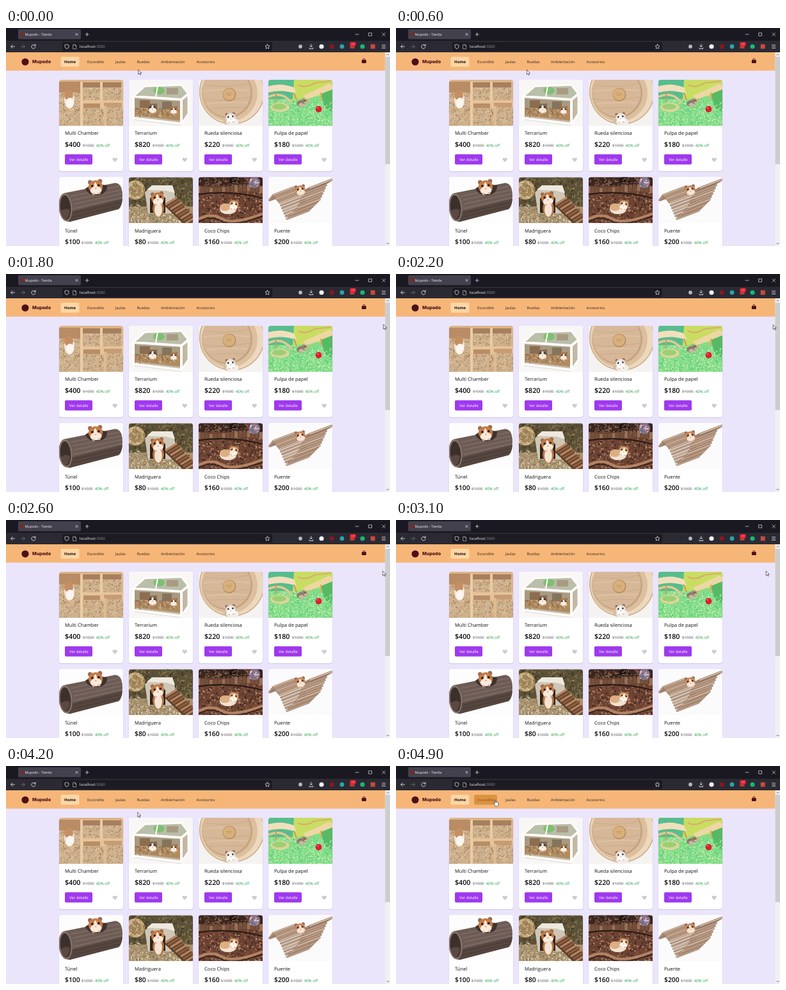
An HTML page that plays this animation: 600x341 px, repeating every 5 s.

```html
<!DOCTYPE html>
<html lang="es">
<head>
<meta charset="utf-8">
<title>Mupodo - Tienda</title>
<style>
html, body { margin: 0; width: 100%; height: 100%; overflow: hidden; background: #ebe5fc; }
svg { display: block; }
text { font-family: "Open Sans", "Noto Sans", sans-serif; white-space: pre; text-rendering: geometricPrecision; }
</style>
</head>
<body>
<svg id="stage" width="100%" height="100%" viewBox="0 0 600 341" preserveAspectRatio="none"></svg>
<script>
const rect = (x, y, w, h, fill, more = '') =>
  `<rect x="${x}" y="${y}" width="${w}" height="${h}" fill="${fill}" ${more}/>`;
const oval = (x, y, rx, ry, fill, more = '') =>
  `<ellipse cx="${x}" cy="${y}" rx="${rx}" ry="${ry}" fill="${fill}" ${more}/>`;
const dot = (x, y, r, fill, more) => oval(x, y, r, r, fill, more);
const shape = (d, fill, more = '') => `<path d="${d}" fill="${fill}" ${more}/>`;
const line = (d, color, width = 1, more = '') =>
  `<path d="${d}" fill="none" stroke="${color}" stroke-width="${width}" ${more}/>`;
const label = (x, y, s, size, fill, more = '') =>
  `<text x="${x}" y="${y}" font-size="${size}" fill="${fill}" ${more}>${s}</text>`;
const group = (move, body) => `<g transform="${move}">${body}</g>`;

function randomFrom(seed) {
  return () => {
    seed = (seed * 1664525 + 1013904223) >>> 0;
    return seed / 4294967296;
  };
}

// Short random strokes: shavings, straw, chips
function flecks(seed, count, x, y, w, h, colors, len = 3, width = 0.9) {
  const rnd = randomFrom(seed);
  return colors.map(color => {
    let d = '';
    for (let i = 0; i < count / colors.length; i++) {
      const a = rnd() * Math.PI, l = len * (0.4 + rnd() * 0.6);
      d += `M${(x + rnd() * w).toFixed(1)} ${(y + rnd() * h).toFixed(1)}` +
           `l${(Math.cos(a) * l).toFixed(1)} ${(Math.sin(a) * l).toFixed(1)}`;
    }
    return line(d, color, width);
  }).join('');
}

// Side view
function hamster(x, y, size, fur, belly = '#f6ece0', turn = 0) {
  return group(`translate(${x} ${y}) rotate(${turn}) scale(${size})`,
    oval(0, 0, 9, 7, fur) + oval(2, 3, 7, 4.2, belly) + dot(7, -4, 5, fur) +
    dot(4, -8.5, 1.9, '#b8806a') + dot(9.6, -8, 1.7, '#b8806a') +
    oval(9, -2, 3, 2.4, belly) + dot(8, -5, 0.9, '#20140f') + dot(12, -3.4, 0.6, '#d88a86'));
}

// Front view of the head and paws
function face(x, y, size, fur, belly = '#f8efe4', turn = 0) {
  return group(`translate(${x} ${y}) rotate(${turn}) scale(${size})`,
    dot(-7, -7, 3, '#9d6a55') + dot(7, -7, 3, '#9d6a55') +
    oval(0, 0, 10, 9, fur) + oval(0, 5, 8, 5.5, belly) + oval(0, -1, 2, 5, belly) +
    dot(-4.6, -1.6, 1.5, '#1d1310') + dot(4.6, -1.6, 1.5, '#1d1310') +
    oval(0, 2.6, 1.2, 0.8, '#d98a86') + oval(-4, 9.5, 1.9, 1.4, '#e5b9a4') + oval(4, 9.5, 1.9, 1.4, '#e5b9a4'));
}

const shavings = ['#ecd9be', '#b98f66', '#dcc09a', '#8f6d50'];

function chamber() {
  const bed = (seed, x, y, w, h) =>
    rect(x, y, w, h, '#cdb08c') + flecks(seed, w * h / 7, x, y, w, h, shavings, 3);
  return rect(0, 0, 100, 72, '#dcb487') +
    rect(0, 3, 33, 19, '#b98c66') + bed(3, 0, 20, 33, 25) +
    rect(37, 4, 27, 10, '#a87f5e') + bed(7, 37, 12, 27, 20) +
    rect(68, 4, 29, 10, '#a87f5e') + bed(11, 68, 12, 29, 20) +
    rect(33, 32, 67, 12, '#e6c398') + rect(38, 37, 26, 7, '#b98d68') + rect(70, 36, 28, 8, '#c79c74') +
    bed(13, 37, 44, 33, 28) + bed(17, 74, 43, 26, 29) + bed(19, 0, 46, 33, 26) +
    rect(33, 3, 4, 69, '#ebcca3') + rect(64, 3, 4, 30, '#ebcca3') + rect(70, 41, 4, 31, '#e0bb90') +
    oval(16, 31, 8, 14, '#f1e6da') + oval(15, 24, 7, 8, '#c58f62') + oval(17, 36, 6, 8, '#faf5ee');
}

function terrarium() {
  const white = '#fdfcfa';
  return rect(0, 0, 100, 72, '#f8f7f6') +
    shape('M7 26L25 10 82 8 93 22V53L82 69 7 60Z', '#c3b8a4') +
    shape('M24 12L80 10 90 22 80 28 12 24Z', '#b9bfa8') +
    oval(47, 17, 9, 6, '#7fbf72') + rect(59, 13, 18, 10, '#a99b83') +
    shape('M9 28L81 32V48L9 44Z', '#a79a80') +
    shape('M9 44L81 47V64L9 56Z', '#b18b60') +
    flecks(23, 150, 10, 44, 68, 13, ['#dcc39a', '#8a6746', '#6f5a45', '#c9a678'], 3.5, 1) +
    rect(17, 32, 16, 12, '#8c6d50') + rect(52, 34, 15, 12, '#85745c') +
    face(37, 44, .75, '#7d654f') + face(70, 47, .6, '#a5764c') +
    line('M7 26L25 10 82 8 93 22V53L82 69', white, 3) +
    line('M7 26L82 31 93 22M82 31V69M7 24V60L82 69', white, 4) +
    line('M45 10L42 27', white, 2) + line('M9 29L80 33M9 62.5L82 71.5', '#cbc4ba', .6);
}

function wheel() {
  return rect(0, 0, 100, 72, '#f5f3f1') +
    dot(52, 19, 51, '#c9a680') + dot(52, 19, 49.6, '#ecd8be') +
    dot(48, 21, 44, '#dcbf9d') + dot(45, 21, 39, '#c5a27f') + dot(44, 20, 37.5, '#d6b899') +
    line('M10 8Q45 14 78 5M8 30Q38 35 80 27M18 45Q45 42 72 44', '#cba988', 1.1) +
    line('M8 18Q38 13 80 17M12 38Q42 34 77 36', '#dfc5a8', 1.3) +
    dot(48, 23, 10.5, '#b58c60') + dot(47.6, 22.6, 9.4, '#d8b07c') +
    line('M43 21.5h9M44 24h7', '#b58c60', .7) +
    oval(51, 66, 13, 5, '#d3bda4') + oval(53, 66, 10, 6, '#f2eee9') +
    face(50, 59, .78, '#e5e0da', '#ffffff', -8);
}

function paperBed() {
  return rect(0, 0, 100, 72, '#84dc88') +
    shape('M0 0H44L40 30H0Z', '#57bd8d') + shape('M40 0H100V24L63 27 38 32Z', '#c9dd63') +
    shape('M82 22L100 14V50L88 44Z', '#58b964') +
    flecks(29, 560, 0, 31, 100, 41, ['#58d179', '#a4eda4', '#c4f0a0', '#4fc08a', '#e2f4c4'], 2.6, 1.2) +
    shape('M0 10Q20 4 40 12L44 22Q20 14 0 20Z', '#f1dfbc') +
    line('M0 27Q22 17 36 36', '#e4c892', 3.5) + line('M12 20V34M40 20L44 32', '#c89a5f', 2) +
    shape('M54 25L95 6 100 9V15L60 31Z', '#eed7a4') +
    line('M62 29V37M82 20V31M46 8Q58 14 72 5L98 2', '#d9ae6a', 2.2) +
    oval(18, 43, 15, 7, '#e0d39a') + oval(17, 42, 11, 4.5, '#9bcf73') +
    hamster(51, 37, .75, '#8d7c6b', '#c7b7a1') +
    dot(78.5, 46, 5, '#df1e32') + oval(77, 44, 1.5, 1, '#f36370');
}

function tunnel() {
  return rect(0, 0, 100, 72, '#fdfdfd') +
    shape('M8 25L88 9Q99 10 99 29 99 44 93 50L16 70Q0 68 0 46 0 29 8 25Z', '#6d5c55') +
    shape('M17 54L99 34Q98 46 93 50L16 70Z', '#564640') +
    line('M18 30L94 14M21 36L97 20M23 42L98 26M23 49L98 32', '#7f6d65', 1.6) +
    line('M23 56L98 39M21 62L96 45', '#4a3b36', 1.3) +
    shape('M41 18Q52 9 75 13 76 25 62 28 45 29 41 18Z', '#3f322e') +
    face(57, 15, 1.12, '#c47c47', '#fbeadb', -6) +
    oval(10, 47, 10.5, 22, '#85726a', 'transform="rotate(-5 10 47)"') +
    oval(10, 47.5, 8.3, 19, '#3c302c', 'transform="rotate(-5 10 47)"') +
    shape('M3 53Q10 47 17 52 15 65 10 66 4 64 3 53Z', '#5a4841');
}

function burrow() {
  let steps = '';
  for (let i = 0; i < 11; i++)
    steps += line(`M${57 + i * 4} ${43 + i * 3.6}l18 -11`, i % 2 ? '#8a5d40' : '#b58460', 3.4);
  return rect(0, 0, 100, 72, '#5d5138') +
    flecks(31, 210, 0, 0, 100, 46, ['#3c4a2e', '#8c7c50', '#77724d', '#43321f'], 7, 1.4) +
    dot(10, 20, 15, '#c6ab7d') + dot(10, 20, 10, '#a3875c') +
    flecks(33, 60, 0, 6, 24, 27, ['#e3cea2', '#876b46'], 5, 1) +
    rect(0, 46, 100, 26, '#ab9370') +
    flecks(37, 240, 0, 42, 90, 30, ['#d9c6a4', '#7c6448', '#efe2c8', '#76805a'], 4, 1.1) +
    shape('M25 24L36 13H68L75 40 66 57H30Z', '#cfc6b6') +
    shape('M28 20L36 13H68L72 25 58 21Z', '#eee9df') +
    shape('M33 56V34Q44 18 57 33V56Z', '#2f231b') +
    oval(46, 49, 9, 13, '#b4733f') + oval(46, 51, 6, 11, '#f3e4d3') +
    face(45, 33, 1.02, '#bf7a44', '#f7eadb', -8) +
    shape('M56 45L73 32 101 60V72H84Z', '#5f402b') + steps;
}

function cocoChips() {
  let logs = '';
  for (let i = 0; i < 17; i++)
    logs += line(`M${i * 6.5} ${14 + Math.sin(i / 2.4) * 3}v11`, i % 3 ? '#75503b' : '#987058', 5);
  return rect(0, 0, 100, 72, '#6b4333') + rect(0, 0, 100, 14, '#3a2620') +
    oval(56, 5, 8, 6, '#1f1513') + logs +
    flecks(41, 420, 0, 24, 100, 48, ['#8f6049', '#3d2620', '#b58569', '#71422f'], 4, 1.8) +
    flecks(47, 60, 0, 0, 80, 14, ['#6d4a38', '#8d6750'], 6, 1.5) +
    line('M0 27Q50 20 100 33', '#2e1d18', 2.5) +
    line('M0 66Q18 55 36 65T100 57', '#b48363', 4) + line('M0 70Q18 59 36 69T100 61', '#3a241c', 2) +
    oval(46, 50, 13, 8, '#f2e3d2') + oval(41, 47, 8, 6, '#ddae82') +
    face(55, 43, .75, '#d9a271', '#fff5e8', 10) +
    dot(87, 8, 9, '#8d7686') +
    flecks(43, 45, 80, 2, 13, 12, ['#5f5796', '#d9617c', '#ede5df', '#43809b'], 3, 1.4);
}

// Sticks of equal length laid along a wave
function bridge() {
  const edge = [[2, 36], [8, 28], [18, 40], [29, 65], [46, 48], [58, 21], [65, 17]];
  const count = 36, cap = 'stroke-linecap="round"';
  let sticks = '';
  for (let i = 0; i <= count; i++) {
    const u = i / count * (edge.length - 1), k = Math.min(Math.floor(u), edge.length - 2);
    const [x, y] = [0, 1].map(n => edge[k][n] + (edge[k + 1][n] - edge[k][n]) * (u - k));
    const d = `M${x.toFixed(1)} ${y.toFixed(1)}l34 -13`;
    sticks += line(d, '#8d6f5c', 3.4, cap) + line(d, i % 3 ? '#bd9d86' : '#d3b8a0', 2.1, cap);
  }
  return rect(0, 0, 100, 72, '#fcfbfb') + sticks + face(50, 20, .8, '#c4895c', '#f6e5d3', -10);
}

const cards = [
  ['Multi Chamber', 400, chamber], ['Terrarium', 820, terrarium],
  ['Rueda silenciosa', 220, wheel], ['Pulpa de papel', 180, paperBed],
  ['Túnel', 100, tunnel], ['Madriguera', 80, burrow],
  ['Coco Chips', 160, cocoChips], ['Puente', 200, bridge]
];

function card([title, price, photo], i) {
  const row = Math.floor(i / 4), cost = '$' + price;
  const size = row ? 10.3 : 10.7;
  const old = 9 + cost.length * size * 0.572 + (row ? 2.3 : 3.4);
  return group(`translate(${83 + i % 4 * 109} ${81 + row * 152.3})`,
    rect(-.4, 1, 100.8, 143.2, '#b9afd0', 'rx="4" opacity=".45"') +
    rect(0, 0, 100, 143, '#fff', 'rx="4"') +
    `<g clip-path="url(#photo)">${photo()}</g>` +
    label(9, 86.3, title, 7.6, '#111') +
    label(9, 105, cost, size, '#080808', 'font-weight="600"') +
    label(old, 105, '$1000', 6.2, '#7c7c84') +
    line(`M${old} 102.8h17.5`, '#7c7c84', .5) +
    label(old + 20.8, 105, '40% off', 6.1, '#1fa046') +
    rect(9, 116.5, 43, 16, '#9f38ef', 'rx="2"') +
    label(16, 126.9, 'Ver detalle', 6, '#fff') +
    shape('M87.2 128.7L84.2 125.6C82.4 123.6 84.7 120.5 87.2 123 89.8 120.5 92 123.6 90.2 125.6Z', '#cbcbd0'));
}

const wine = '#4b1018', pale = '#f4f3f8';

function browser() {
  const stroke = (d, color = pale, w = .8) => line(d, color, w, 'stroke-linecap="round" stroke-linejoin="round"');
  return rect(0, 0, 600, 20, '#1a1921') + rect(0, 20, 600, 18, '#2b2a33') +
    rect(19, 2, 98, 15.5, '#42414d', 'rx="2"') + dot(25.5, 10, 3, '#7a2b22') +
    label(29.5, 12, 'Mupodo - Tienda', 5.3, pale) +
    stroke('M108.8 8.2l3.4 3.4m0-3.4l-3.4 3.4M124.2 10h5M126.7 7.5v5', pale, .7) +
    stroke('M546 10h5M567 7.7h4.5v4.5h-4.5zM588 7.7l4.6 4.6m0-4.6l-4.6 4.6', pale, .65) +
    stroke('M13.5 29H7.8m2.5-2.6L7.6 29l2.7 2.6') +
    stroke('M23.5 29h5.7m-2.5-2.6l2.7 2.6-2.7 2.6', '#77767f') +
    stroke('M45.4 27.2A3.1 3.1 0 1 0 46 29.8M46.1 25.5v2.3h-2.3') +
    rect(88, 22, 328, 14, '#1c1b22', 'rx="2"') +
    stroke('M95 25.8l3 1v2.2q0 2.5-3 3.6-3-1.1-3-3.6v-2.2z', pale, .7) +
    stroke('M105 26h3l1.7 1.7v5H105zM108 26v2h1.7', '#d5d4da', .6) +
    label(115, 31, 'localhost<tspan fill="#92919b">:3000</tspan>', 5.9, pale) +
    stroke('M408.5 25.5l1.1 2.2 2.4.4-1.7 1.7.4 2.5-2.2-1.2-2.2 1.2.4-2.5-1.7-1.7 2.4-.4z', pale, .7) +
    dot(460, 29, 2.9, '#b9b8c0') +
    stroke('M476.8 25.5v4.3m-1.9-1.9l1.9 1.9 1.9-1.9M474 31v1.5h5.6V31') +
    dot(493, 29, 3.6, '#f6f6f6') + dot(509, 29, 3.4, '#8d1620') + dot(525, 29, 3.4, '#27a5ad') +
    rect(537.5, 26, 7, 6, '#c23b36') + rect(537.5, 22.2, 9.2, 6, '#e51f32', 'rx="1"') +
    label(542.1, 27, '17', 4.7, '#fff', 'text-anchor="middle"') +
    dot(557, 29, 3.6, '#17b879') + rect(569.7, 25.5, 7, 7, '#c84a3c') +
    stroke('M587.5 26.7h5.2m-5.2 2.4h5.2m-5.2 2.4h5.2', pale, .7);
}

const links = [['Escondite', 127], ['Jaulas', 171], ['Ruedas', 204.5], ['Ambientación', 242], ['Accesorios', 297.5]];

function page() {
  return rect(0, 38, 593, 303, '#ebe5fc') + rect(0, 38, 593, 28.7, '#f6b678') +
    dot(30, 53, 5.6, wine) +
    label(41, 55.4, 'Mupodo', 7.1, wine, 'font-weight="800" style="font-family:Inter,sans-serif"') +
    rect(85.5, 45, 29, 15.5, '#fdd6a6', 'rx="2"') +
    rect(122, 45, 36, 15.5, '#d9943f', 'id="hover" rx="2"') +
    label(91, 55, 'Home', 6.1, '#171211', 'font-weight="700"') +
    links.map(([s, x], i) => label(x, 55, s, 5.8, '#33251d', i ? '' : 'id="link"')).join('') +
    rect(555.8, 50, 7, 5, wine, 'rx="1"') + line('M557.6 50.5v-.8a1.7 1.7 0 0 1 3.4 0v.8', wine, 1) +
    cards.map(card).join('') +
    rect(592.5, 38, 7.5, 303, '#f0f0f0') + rect(592.5, 45, 7.5, 168, '#cdcdcd') +
    line('M594.7 42.6l1.8-1.8 1.8 1.8M594.7 336.2l1.8 1.8 1.8-1.8', '#555', .9);
}

const pointer = 'fill="#fff" stroke="#111" stroke-width=".6" stroke-linejoin="round"';
document.getElementById('stage').innerHTML =
  '<defs><clipPath id="photo"><path d="M0 72V4Q0 0 4 0H96Q100 0 100 4V72Z"/></clipPath></defs>' +
  page() + browser() +
  `<g id="cursor"><path id="arrow" d="M0 0V7.1L1.6 5.6 2.8 8.2 4 7.7 2.9 5.2H5.1Z" ${pointer}/>
  <path id="hand" d="M-.7 .6Q0 -.6 .8 .6V3.5L1.1 3Q2 2.5 2.3 3.5 3.2 2.8 3.7 3.9 4.8 3.5 5 4.8V7Q5 8.6 3.8 9.9H.5Q-1 7.7 -2.5 6 -2.5 4.7 -1.3 5.2L-.7 5.8Z" ${pointer}/></g>`;

const $ = id => document.getElementById(id);
const hover = $('hover'), link = $('link'), cursor = $('cursor'), arrow = $('arrow'), hand = $('hand');

// time, x, y of the pointer tip
const path = [
  [0, 206.7, 65.2], [1100, 202.7, 65.8], [1700, 589.7, 79], [1900, 589.7, 79],
  [2600, 588.7, 79.8], [3100, 578.2, 79.8], [3900, 207, 73], [4200, 205.7, 72.5],
  [4800, 155, 53.2], [5000, 155, 53.2]
];

function pointerAt(t) {
  const i = path.findIndex(p => p[0] > t), a = path[i - 1], b = path[i];
  const f = (t - a[0]) / (b[0] - a[0]), e = f * f * (3 - 2 * f);
  return [a[1] + (b[1] - a[1]) * e, a[2] + (b[2] - a[2]) * e];
}

function draw(now) {
  const t = Math.floor(now % 5000 / 100) * 100;
  const [x, y] = pointerAt(t);
  const over = x > 122 && x < 158 && y > 45 && y < 60.5;
  const show = (node, on) => node.setAttribute('visibility', on ? 'visible' : 'hidden');
  cursor.setAttribute('transform', `translate(${x.toFixed(2)} ${y.toFixed(2)})`);
  show(hover, over);
  show(hand, over);
  show(arrow, !over);
  link.setAttribute('fill', over ? '#a34a20' : '#33251d');
}

const start = performance.now();
function tick() {
  draw(performance.now() - start);
  requestAnimationFrame(tick);
}
tick();
</script>
</body>
</html>
```
